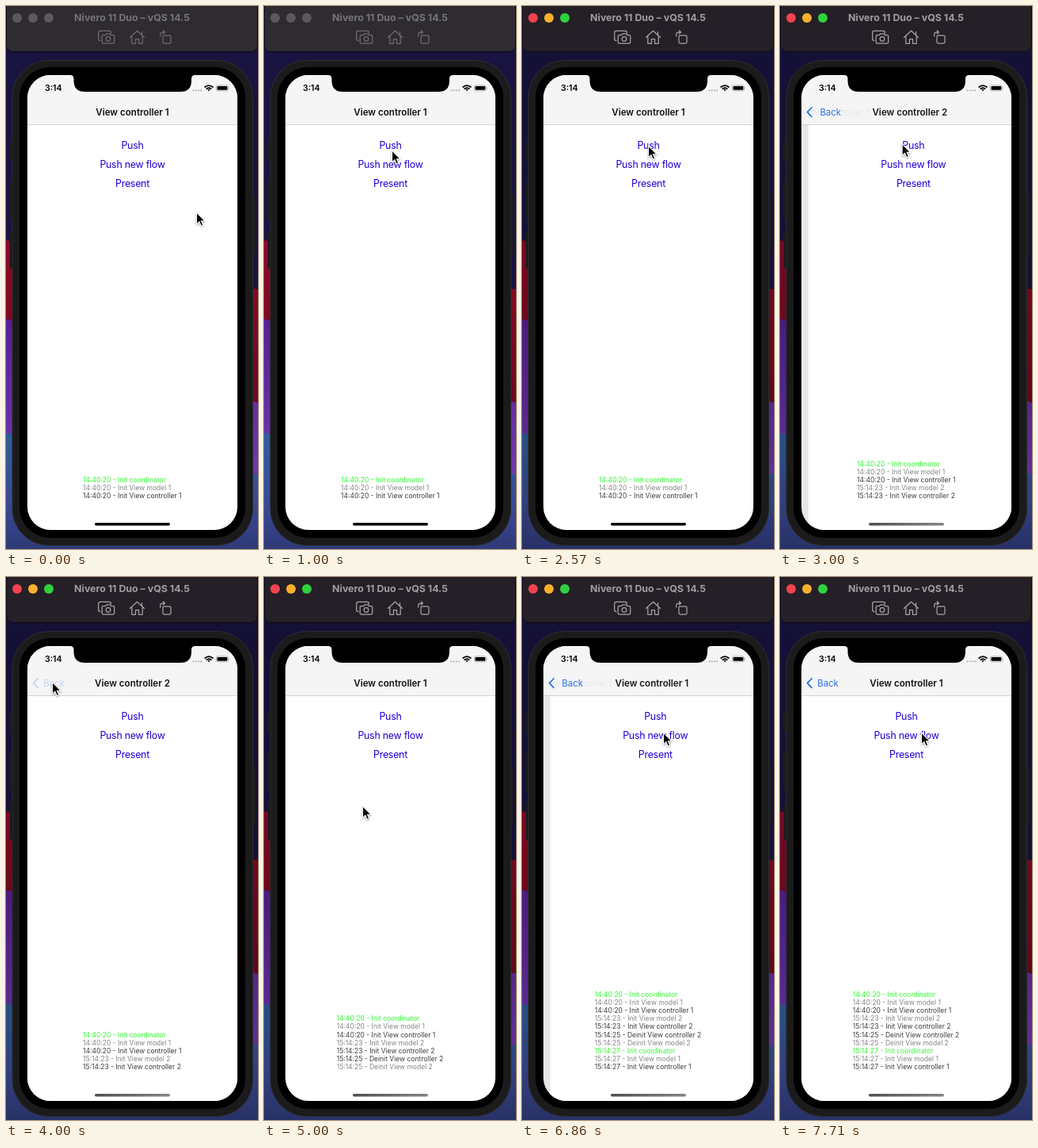
Animation of 318x684 px, one loop 8000 ms. Source, as an HTML page:

```html
<!DOCTYPE html>
<html lang="en">
<head>
<meta charset="utf-8">
<title>Navigation demo</title>
<style>
html, body { margin: 0; width: 100%; height: 100%; overflow: hidden; background: #17133a; }
svg { display: block; width: 318px; height: 684px; font-family: Inter, Roboto, sans-serif; }
.mid { text-anchor: middle; }
.links { font-size: 12.4px; letter-spacing: -.02em; fill: #1f00d6; }
.nav { font-size: 11.6px; font-weight: 600; fill: #111; }
.log { font-size: 8.5px; }
.icons { fill: none; stroke-width: 1.25; stroke-linejoin: round; stroke-linecap: round; }
#cursor { stroke: #fff; stroke-width: 1.1; filter: drop-shadow(0 1px 1px #0006); }
</style>
</head>
<body>
<svg viewBox="0 0 318 684">
  <defs>
    <linearGradient id="bar" x2="1"><stop stop-color="#505050"/><stop offset="1" stop-color="#858585"/></linearGradient>
    <linearGradient id="red" x2="0" y2="1"><stop stop-color="#8c0a26"/><stop offset="1" stop-color="#70091c"/></linearGradient>
    <linearGradient id="violet" x2="0" y2="1"><stop stop-color="#582092"/><stop offset="1" stop-color="#7038b0"/></linearGradient>
    <linearGradient id="blue" x2="0" y2="1"><stop stop-color="#2f5e98"/><stop offset=".6" stop-color="#3b4a94"/><stop offset="1" stop-color="#2f3a78"/></linearGradient>
    <clipPath id="screen"><rect x="27" y="87" width="265" height="573" rx="29"/></clipPath>
    <clipPath id="page"><rect x="27" y="149" width="265" height="511"/></clipPath>
    <g id="links" class="links mid">
      <text x="159.5" y="179.6">Push</text>
      <text x="159.5" y="203.6">Push new flow</text>
      <text x="159.5" y="227.6">Present</text>
    </g>
  </defs>

  <!-- desktop -->
  <rect width="318" height="684" fill="#19143f"/>
  <path d="M0 295L318 357V501L0 396Z" fill="url(#red)"/>
  <path d="M0 394L318 500V592L0 540Z" fill="url(#violet)"/>
  <path d="M0 538L318 590V684H0Z" fill="url(#blue)"/>
  <rect id="shade" width="318" height="684"/>

  <!-- toolbar window -->
  <rect id="toolbar" x=".5" y="-10" width="317" height="67.5" rx="8" stroke="#0b0916"/>
  <g id="lights"><circle cx="14" cy="15" r="6"/><circle cx="34" cy="15" r="6"/><circle cx="54" cy="15" r="6"/></g>
  <text id="caption" class="mid" x="159" y="19" font-size="12.4" font-weight="700">Nivero 11 Duo – vQS 14.5</text>
  <g id="icons" class="icons">
    <path d="M119 43.5Q116.7 43.5 116.7 41.5V33.5Q116.7 31.3 119 31.3H130Q132.5 31.3 132.5 34"/>
    <path d="M122.5 36.5H125.5L127 34.8H131L132.5 36.5H135.2Q136.7 36.5 136.7 38V45.5Q136.7 47.2 135 47.2H123Q121.2 47.2 121.2 45.5V38Q121.2 36.5 122.5 36.5Z"/>
    <circle cx="129" cy="41.5" r="2.8"/>
    <path d="M156.5 39.5L165.5 31.3L174.5 39.5M158.8 38V47.3H163.5V41.5H167.5V47.3H172.2V38M171.5 36.5V32.5"/>
    <rect x="198" y="37" width="10" height="10" rx="1.5"/>
    <path d="M194.7 38V36Q194.7 33 197.5 33H200M198.3 31L200.5 33L198.3 35"/>
  </g>

  <!-- handset -->
  <g fill="#17171a" stroke="#29292d" stroke-width=".7">
    <rect x="5" y="171" width="5" height="24" rx="1.5"/>
    <rect x="5" y="221" width="5" height="47" rx="1.5"/>
    <rect x="5" y="285" width="5" height="46" rx="1.5"/>
    <rect x="309" y="238" width="5" height="75" rx="1.5"/>
    <rect x="8" y="68.5" width="303.5" height="611" rx="46" fill="#1b1b1c" stroke="#2d2d30" stroke-width="1"/>
  </g>
  <rect x="17" y="77" width="285" height="593" rx="38"/>

  <g clip-path="url(#screen)">
    <rect x="27" y="87" width="265" height="573" fill="#fff"/>
    <g clip-path="url(#page)">
      <use id="rootPage" href="#links"/>
      <rect id="dim" x="27" y="149" width="265" height="511"/>
      <g id="pushedPage"><rect x="27" y="149" width="265" height="511" fill="#fff"/><use href="#links"/></g>
    </g>
    <rect x="27" y="87" width="265" height="62.2" fill="#f5f5f5"/>
    <rect x="27" y="149.2" width="265" height=".7" fill="#c4c4c4"/>
    <text id="rootTitle" class="nav mid" x="159.5" y="137.6">View controller 1</text>
    <text id="pushedTitle" class="nav mid" x="159.5" y="137.6"></text>
    <g id="back">
      <path d="M40 128L34.5 133.7L40 139.4" fill="none" stroke="#2570e6" stroke-width="1.8" stroke-linecap="round" stroke-linejoin="round"/>
      <text id="backLabel" x="47.2" y="137.7" font-size="11.4" fill="#2570e6">Back</text>
    </g>
    <g id="log" class="log"></g>
    <rect id="home" x="112" y="651" width="95" height="3.4" rx="1.7"/>
    <text x="49" y="107" font-size="10.6" font-weight="600">3:14</text>
    <path d="M235.5 106.3H247" stroke="#aaa" stroke-width="1.8" stroke-dasharray="1.8 1.4"/>
    <g fill="none" stroke="#000" stroke-width="1.7">
      <path d="M250.6 102.5Q256 97.8 261.4 102.5M252.6 104.7Q256 101.8 259.4 104.7"/>
      <path d="M256 107.3L254.3 105.5Q256 104.3 257.7 105.5Z" fill="#000" stroke="none"/>
      <rect x="265.4" y="99.9" width="15" height="7" rx="2" stroke="#999" stroke-width=".7"/>
    </g>
    <rect x="266.5" y="101" width="12.8" height="4.8" rx="1.1"/>
    <path d="M281.3 102V105Q282.6 103.5 281.3 102Z" fill="#999"/>
    <path d="M81 86V87Q85.5 87 85.5 91.5V94Q85.5 108 99.500 108H220Q234 108 234 94V91.5Q234 87 238.5 87V86Z"/>
  </g>

  <path id="cursor" d="M0 0V14.8L3.4 11.7L5.7 17L8.2 15.9L6 10.7H10.5Z"/>
</svg>
<script>
const LOOP = 8000;
const ACTIVATE = 2000, PUSH = 2714, PRESS = 4000, POP = 4143, RELEASED = 4714, NEW_FLOW = 6571;

const LOG = [
  [0, '14:40:20 - Init coordinator'],
  [0, '14:40:20 - Init View model 1'],
  [0, '14:40:20 - Init View controller 1'],
  [PUSH, '15:14:23 - Init View model 2'],
  [PUSH, '15:14:23 - Init View controller 2'],
  [RELEASED, '15:14:25 - Deinit View controller 2'],
  [RELEASED, '15:14:25 - Deinit View model 2'],
  [NEW_FLOW, '15:14:27 - Init coordinator'],
  [NEW_FLOW, '15:14:27 - Init View model 1'],
  [NEW_FLOW, '15:14:27 - Init View controller 1'],
];

// time, x, y of the pointer tip
const PATH = [
  [0, 240.5, 260], [1000, 161.5, 182], [1714, 159.5, 176], [2860, 159.5, 176],
  [3860, 58.5, 132.5], [4143, 58.5, 132.5], [4714, 124.5, 288.5], [5000, 124.5, 288.5],
  [6286, 178.5, 196], [LOOP, 178.5, 196],
];

const $ = id => document.getElementById(id);
const set = (id, attributes) => {
  for (const name in attributes) $(id).setAttribute(name, attributes[name]);
};
const slide = (id, x, opacity = 1) => set(id, { transform: `translate(${x} 0)`, opacity });

function pointer(t) {
  const i = PATH.findIndex(key => key[0] > t);
  const [t0, x0, y0] = PATH[i - 1], [t1, x1, y1] = PATH[i];
  const u = (t - t0) / (t1 - t0), e = u * u * (3 - 2 * u);
  return [x0 + (x1 - x0) * e, y0 + (y1 - y0) * e];
}

// critically damped spring from 0 to 1
function spring(ms) {
  const k = Math.max(0, ms) * 0.01826;
  return ms > 560 ? 1 : 1 - (1 + k) * Math.exp(-k);
}

function drawLog(t) {
  const lines = LOG.filter(([start]) => t >= start).map(([, text]) => text);
  const left = t >= RELEASED ? 91.7 : 97;
  const color = text => /coord/.test(text) ? '#2bfb2b' : /model/.test(text) ? '#858585' : '#3c3c3c';
  $('log').innerHTML = lines.map((text, i) =>
    `<text x="${left}" y="${620 - (lines.length - 1 - i) * 10.12}" fill="${color(text)}">${text}</text>`).join('');
}

function drawWindow(active) {
  set('toolbar', { fill: active ? '#251f27' : '#2e2b31' });
  set('shade', { opacity: active ? 0.15 : 0 });
  set('caption', { fill: active ? '#a09da1' : '#76737a' });
  set('icons', { stroke: active ? '#a5a2a6' : '#6d6a70' });
  const colors = active ? ['#f2424f', '#f6b02c', '#2fd13f'] : Array(3).fill('#5b585e');
  [...$('lights').children].forEach((light, i) => light.setAttribute('fill', colors[i]));
}

function render(t) {
  const p = t < NEW_FLOW ? spring(t - PUSH) - spring(t - POP) : spring(t - NEW_FLOW);
  drawWindow(t >= ACTIVATE);
  drawLog(t);
  slide('rootPage', -80 * p);
  slide('pushedPage', 265 * (1 - p));
  set('dim', { opacity: 0.1 * p });
  slide('rootTitle', -95 * p, 1 - p);
  slide('pushedTitle', 130 * (1 - p), p);
  $('pushedTitle').textContent = 'View controller ' + (t < NEW_FLOW ? 2 : 1);
  set('back', { opacity: p * (t >= PRESS && t < NEW_FLOW ? 0.25 : 1) });
  slide('backLabel', 95 * (1 - p));
  set('home', { fill: t < PUSH ? '#000' : 'url(#bar)' });
  set('cursor', { transform: `translate(${pointer(t)})` });
}

function tick(now) {
  const step = Math.floor((now % LOOP + 5) * 7 / 1000);
  render(Math.min(Math.ceil(step * 1000 / 7), LOOP - 1));
  requestAnimationFrame(tick);
}
tick(performance.now());
</script>
</body>
</html>
```
